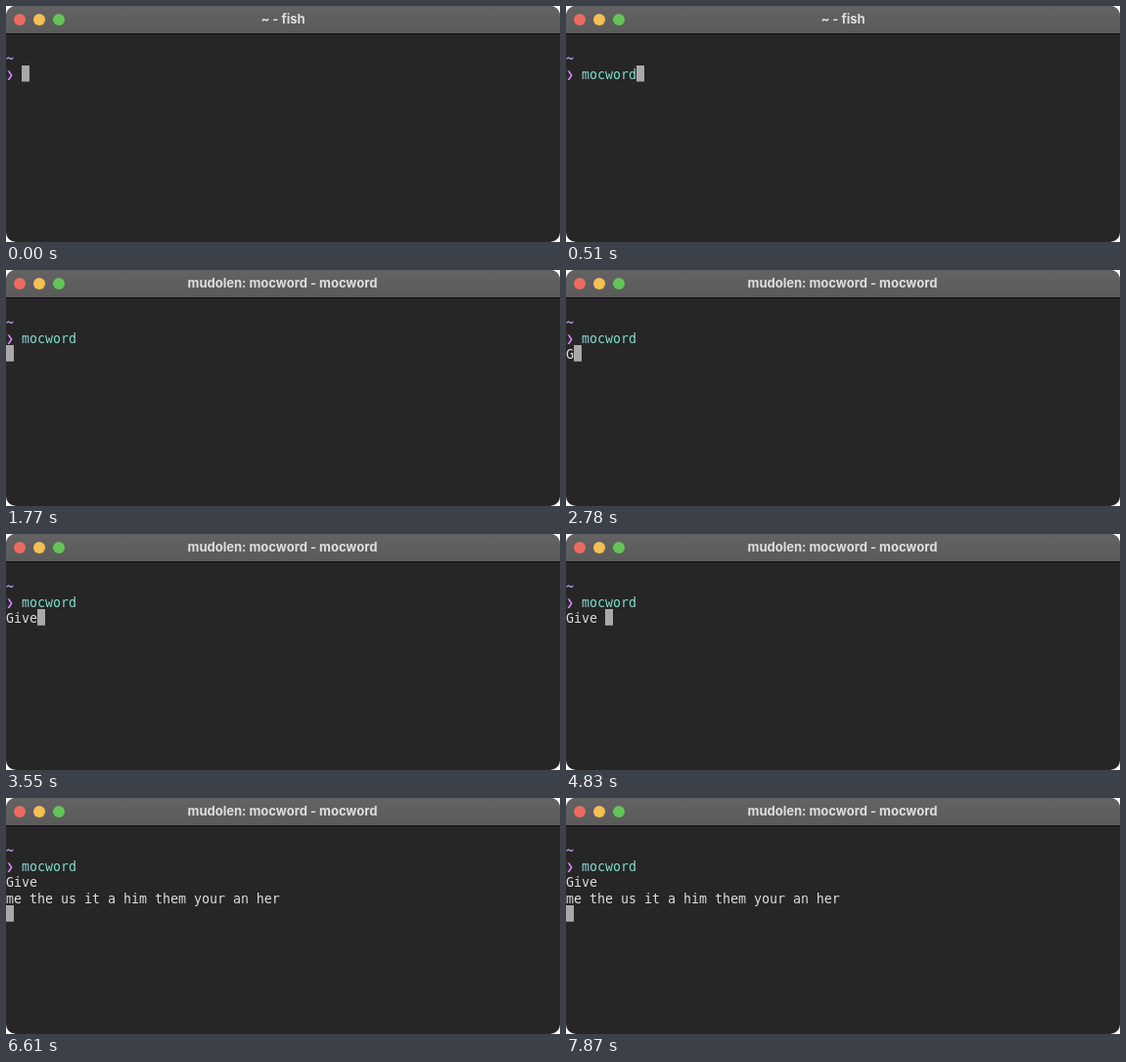
These frames come from a looping animation (566x242 px, 8 s). An HTML page:

```html
<!DOCTYPE html>
<html lang="en">
<head>
<meta charset="utf-8">
<title>Terminal</title>
<style>
  html, body { margin: 0; width: 100%; height: 100%; overflow: hidden; background: #fff; }
  svg { display: block; width: 566px; height: 242px; }
  text { white-space: pre; }
  .title { font: 700 13px Inter, "Open Sans", sans-serif; fill: #dedede; text-anchor: middle; }
  .line { font: 13.29px "DejaVu Sans Mono", "Liberation Mono", monospace; fill: #dcdcdc; }
  .path { fill: #a89cf0; font-weight: 700; }
  .prompt { fill: #cb80f2; font-weight: 700; }
  .command { fill: #80dcd4; }
  .cursor { fill: #a9a9a9; animation-name: cursor; }

  .cursor, .typed, .shell, .running, .first, .second, .third, .reply {
    animation-duration: 8s;
    animation-timing-function: step-end;
    animation-iteration-count: infinite;
  }
  .typed { animation-name: typed; }
  .shell { animation-name: leave; }
  .running { animation-name: run; }
  .first { animation-name: first; }
  .second { animation-name: second; }
  .third { animation-name: third; }
  .reply { animation-name: reply; }

  @keyframes typed  { 0% { fill-opacity: 0 } 6.375%, 100% { fill-opacity: 1 } }
  @keyframes leave  { 0% { fill-opacity: 1 } 9.625%, 100% { fill-opacity: 0 } }
  @keyframes run    { 0% { fill-opacity: 0 } 9.625%, 100% { fill-opacity: 1 } }
  @keyframes first  { 0% { fill-opacity: 0 } 34.75%, 100% { fill-opacity: 1 } }
  @keyframes second { 0% { fill-opacity: 0 } 41.25%, 100% { fill-opacity: 1 } }
  @keyframes third  { 0% { fill-opacity: 0 } 44.375%, 100% { fill-opacity: 1 } }
  @keyframes reply  { 0% { fill-opacity: 0 } 63.625%, 100% { fill-opacity: 1 } }
  @keyframes cursor {
    0% { transform: translate(16px, 61px) }
    6.375% { transform: translate(72px, 61px) }
    9.625% { transform: translate(0, 77.5px) }
    34.75% { transform: translate(8px, 77.5px) }
    41.25% { transform: translate(24px, 77.5px) }
    44.375% { transform: translate(32px, 77.5px) }
    50.75% { transform: translate(40px, 77.5px) }
    63.625%, 100% { transform: translate(0, 110.5px) }
  }
</style>
</head>
<body>
<svg viewBox="0 0 566 242">
  <defs>
    <linearGradient id="bar" x2="0" y2="1">
      <stop stop-color="#636363"/>
      <stop offset="1" stop-color="#5a5a5a"/>
    </linearGradient>
    <clipPath id="window"><rect width="566" height="242" rx="10"/></clipPath>
  </defs>
  <g clip-path="url(#window)">
    <rect width="566" height="242" fill="#262626"/>
    <rect width="566" height="28" fill="url(#bar)"/>
    <rect y="28" width="566" height="1" fill="#0c0c0c"/>
  </g>
  <circle cx="14" cy="14" r="6" fill="#ed6a5e"/>
  <circle cx="34" cy="14" r="6" fill="#f5bf4f"/>
  <circle cx="54" cy="14" r="6" fill="#62c554"/>

  <text class="title shell" x="283" y="18">~ - fish</text>
  <text class="title running" x="282.5" y="18">mudolen: mocword - mocword</text>

  <rect class="cursor" width="8" height="16.5"/>
  <text class="line path" x="0" y="58">~</text>
  <text class="line prompt" x="0" y="74.5">❯</text>
  <text class="line command typed" x="16" y="74.5">mocword</text>
  <text class="line" x="0" y="91"><tspan class="first">G</tspan><tspan class="second">iv</tspan><tspan class="third">e</tspan></text>
  <text class="line reply" x="0" y="107.5">me the us it a him them your an her</text>
</svg>
</body>
</html>
```
